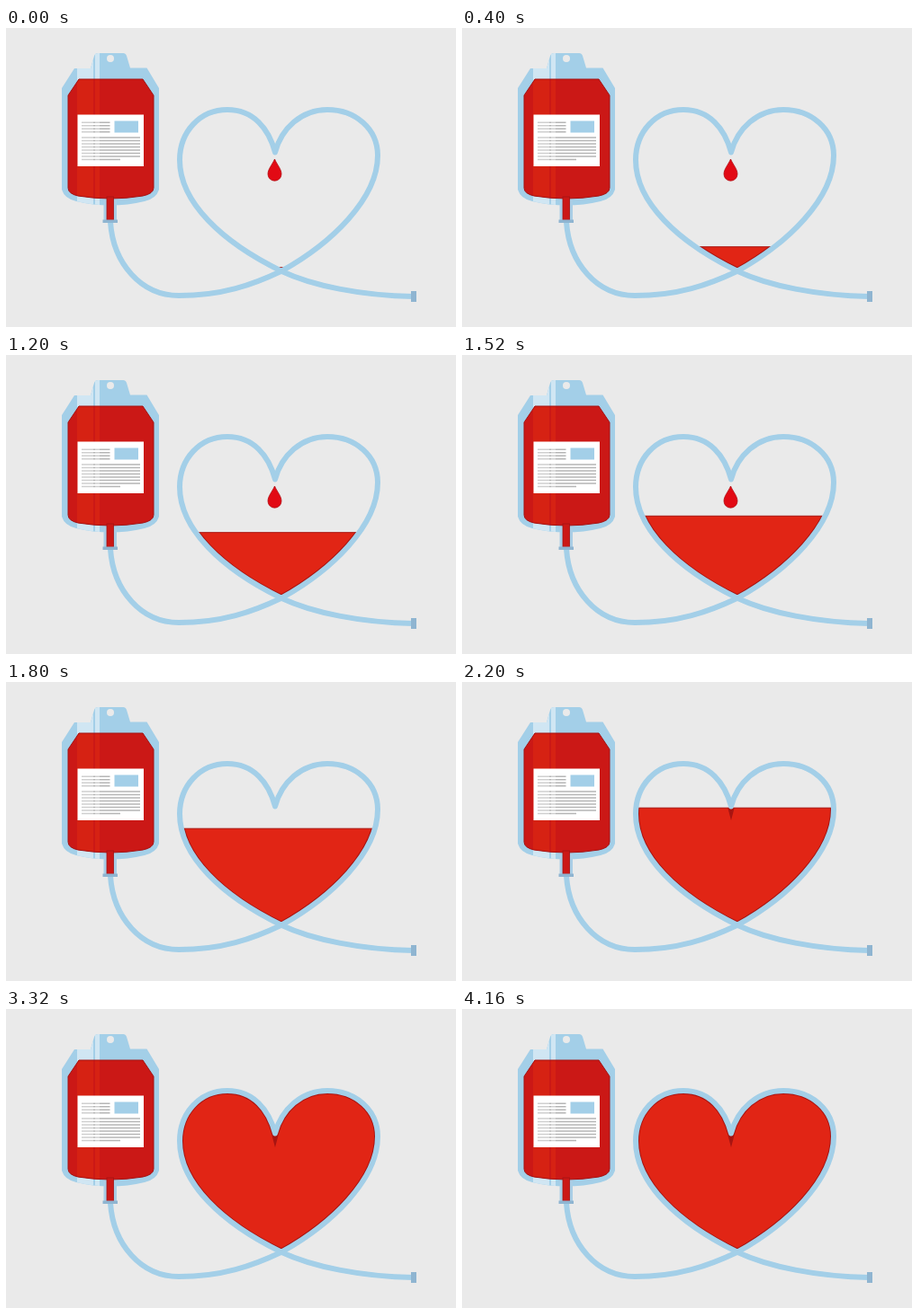
An HTML page for the animation above (4200 ms loop, 500 px wide and 333 px high).

```html
<!DOCTYPE html>
<html lang="en">
<head>
<meta charset="utf-8">
<title>Blood donation</title>
<style>
  html, body { margin: 0; width: 100%; height: 100%; overflow: hidden; background: #eaeaea; }
  svg { display: block; width: 100vw; height: 100vh; }
</style>
</head>
<body>
<svg viewBox="0 0 500 333">
  <defs>
    <path id="heart" d="M306 270.7C362 239.5 413 190 413 142C413 112 388 91 357 91C328 91 306 112 299 138.5C292 112 275 91 246 91C215 91 193 116 193 147C193 194 240 238.5 306 270.7Z"/>
    <path id="bag" d="M76 45H94L98 31Q99 28 102 28H130Q133 28 134 31L138 44.5H156.5L170 67V180Q167 190 154 193Q116 202 78 193Q65 190 62 180V67Z"/>
    <path id="blood" d="M81 57H152L164 75V178Q164 184.5 152 187Q116 193 80 187Q69 184.5 69 178V75Z"/>
    <path id="sheen" d="M79 20H97V210H79ZM99 20H104V210H99Z"/>
    <rect id="level" x="180" width="245" height="200"/>
    <clipPath id="inBag"><use href="#bag"/></clipPath>
    <clipPath id="inBlood"><use href="#blood"/></clipPath>
    <clipPath id="inHeart"><use href="#heart"/></clipPath>
    <clipPath id="belowLevel"><use href="#level"/></clipPath>
  </defs>

  <g clip-path="url(#inHeart)" stroke="#a81411">
    <use href="#level" fill="#e12515" stroke-width="1"/>
    <g clip-path="url(#belowLevel)">
      <use href="#heart" fill="none" stroke-width="8"/>
    </g>
  </g>
  <path id="drop" fill="#e20a14" stroke="#b00d13" stroke-width=".8" d="M298.5 146C296 152 291 157 291 162.7A7.5 7.5 0 0 0 306 162.7C306 157 301 152 298.5 146Z"/>

  <g fill="none" stroke="#a3cfe8" stroke-width="6" stroke-linejoin="round">
    <path d="M116 216C119 262 150 298 192 298C240 298 274 286 306 270.7"/>
    <use href="#heart"/>
    <path d="M306 270.7C340 287 395 298 453 299"/>
  </g>
  <rect x="450" y="293" width="6" height="12" fill="#8fb5d1"/>

  <use href="#bag" fill="#a3cfe8"/>
  <use href="#sheen" fill="#d0e6f3" clip-path="url(#inBag)"/>
  <circle cx="116" cy="34" r="4" fill="#eaeaea"/>
  <rect x="108.5" y="189" width="14.5" height="26" fill="#a9cde5"/>
  <use href="#blood" fill="#cb1816"/>
  <use href="#sheen" fill="#d62213" clip-path="url(#inBlood)"/>
  <use href="#blood" fill="none" stroke="#a31213"/>
  <rect x="112" y="188" width="7.5" height="26" fill="#cb1816" stroke="#a31213" stroke-width=".8"/>
  <rect x="107.5" y="213.5" width="16.5" height="3.5" fill="#8fb5d1"/>

  <rect x="79.5" y="96.5" width="73.5" height="57.5" fill="#fff"/>
  <rect x="120.5" y="103.5" width="26.5" height="13" fill="#a3cfe8"/>
  <path id="lines" stroke="#b5b5b5" stroke-width="1.5"/>
  <path d="M80 97H97V153H80ZM99 97H104V153H99Z" fill="#fff" opacity=".35"/>
</svg>
<script>
  const LOOP = 4200, STEP = 40;
  const START_Y = 266.7, SPEED = 0.0575, DROP_END = 1640;
  const byId = id => document.getElementById(id);
  const level = byId('level'), drop = byId('drop');

  const rows = (count, y, x2) =>
    Array.from({ length: count }, (_, i) => `M84 ${y + i * 3.5}H${x2}`).join('');
  byId('lines').setAttribute('d', rows(4, 105.3, 115.5) + rows(7, 122, 149) + rows(1, 146.5, 127));

  function draw(time) {
    const t = Math.floor((time % LOOP) / STEP) * STEP;
    level.setAttribute('y', Math.max(80, START_Y - SPEED * t));
    drop.setAttribute('visibility', t < DROP_END ? 'visible' : 'hidden');
  }

  const origin = performance.now();
  function tick() {
    draw(performance.now() - origin);
    requestAnimationFrame(tick);
  }
  tick();
</script>
</body>
</html>
```
